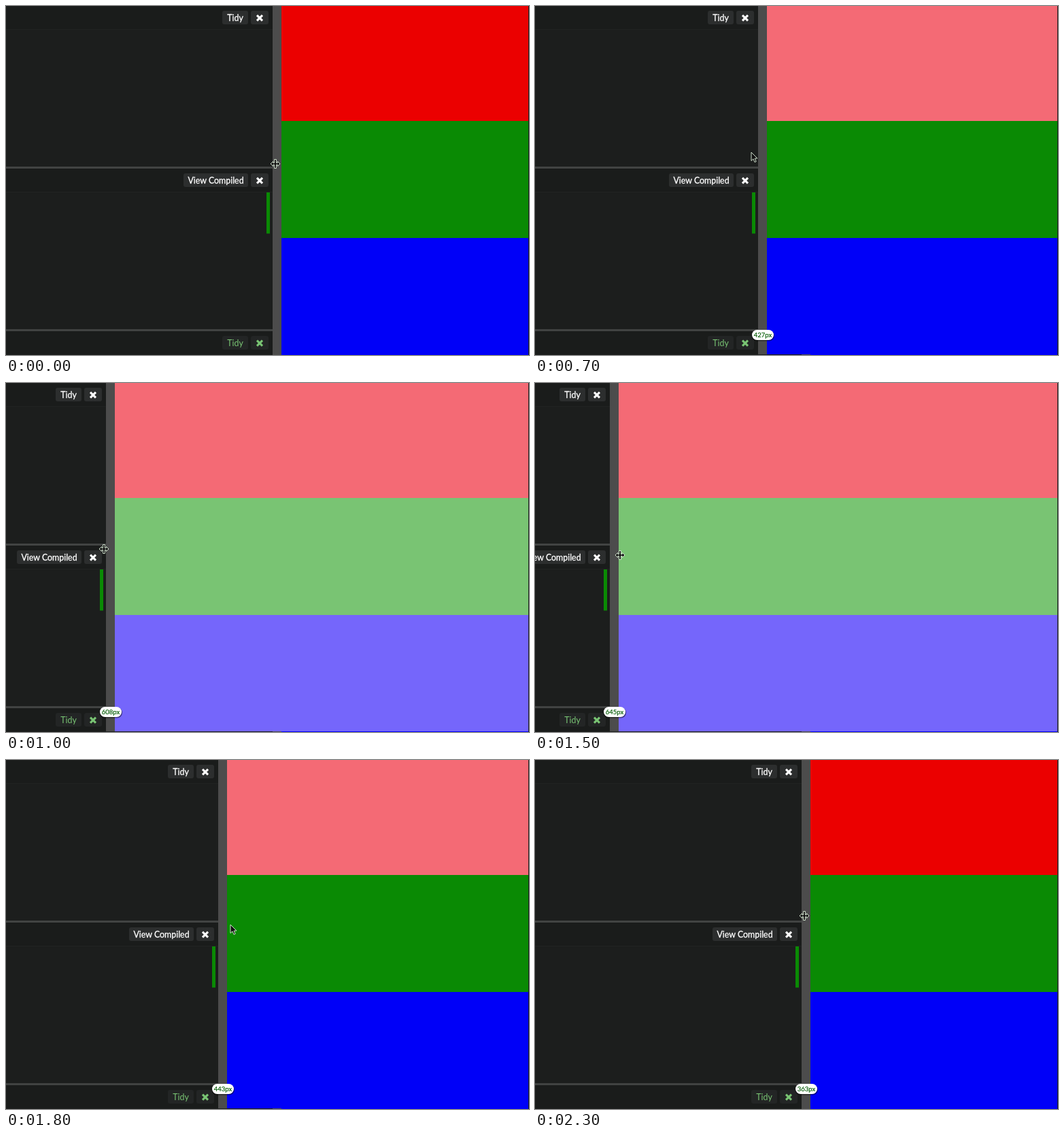
These frames come from a looping animation (769x513 px, 2400 ms). An HTML page:

```html
<!DOCTYPE html>
<html lang="en">
<head>
<meta charset="utf-8">
<title>Resizing split pane</title>
<style>
  html, body { margin: 0; width: 100%; height: 100%; overflow: hidden; background: #1c1e1d; }
  svg { display: block; font: 12.4px Lato, sans-serif; text-anchor: middle; }
  .label { fill: #fff; stroke: #fff; stroke-width: .3; }
  .button { fill: #2c2e2e; }
  .cross { stroke: #fff; stroke-width: 3.1; }
  .dim .label { fill: #79c473; stroke: none; }
  .dim .button { fill: #232525; }
  .dim .cross { stroke: #79c473; }
  .cursor { fill: #111; stroke: #e4f5e0; stroke-width: .9; }
</style>
</head>
<body>
<svg width="769" height="513" viewBox="0 0 769 513">
  <g id="pane">
    <g id="editors"></g>
    <rect x="-9" y="274" width="5" height="60.5" fill="#0a8a04"/>
    <rect width="14" height="513" fill="#4c4c4c"/>
    <g id="bands">
      <rect x="13" width="769" height="169"/>
      <rect x="13" y="169" width="769" height="172"/>
      <rect x="13" y="341" width="769" height="172"/>
    </g>
  </g>
  <rect x="768" width="1" height="513" fill="#181a1a"/>
  <g id="lastRow">
    <rect y="512" width="392" height="1" fill="#1c1e1d"/>
    <rect x="392" y="512" width="13" height="1" fill="#4c4c4c"/>
    <rect x="405" y="512" width="363" height="1" fill="#0000f8"/>
  </g>
  <g id="pill">
    <rect x="-16.5" y="477" width="33.5" height="15.5" rx="7.7" opacity=".45"/>
    <rect x="-16" y="476" width="32" height="15" rx="7.5" fill="#fff"/>
    <text id="size" y="487" font-size="9.5" fill="#0b600b" stroke="#0b600b" stroke-width=".2"></text>
  </g>
  <path id="arrow" class="cursor" d="M0 0V12.5L3 9.8 5 14.5 7.2 13.6 5.2 9H9Z"/>
  <path id="resize" class="cursor" d="M-7 0L-3.2-3.6V-1.3H-1.4V-6.5H1.4V-1.3H3.2V-3.6L7 0 3.2 3.6V1.3H1.4V6.5H-1.4V1.3H-3.2V3.6Z"/>
</svg>
<script>
const $ = id => document.getElementById(id);
const STEP = 100, LOOP = 2400;
const FULL = ['#eb0000', '#0a8a04', '#0000f8'];
const PALE = ['#f46a75', '#79c473', '#7566fb'];
const BREAKPOINTS = [400, 600, 600];

// step, divider x, mouse x, mouse y
const KEYS = [
  [1, 392, 396, 232], [2, 390, 391, 231], [4, 377, 372, 227], [7, 328, 318, 215],
  [10, 147, 144, 244], [11, 117, 119, 248], [12, 106, 109, 250], [14, 106, 109, 250],
  [15, 110, 125, 253], [16, 168, 200, 254], [18, 312, 330, 242], [19, 367, 381, 232],
  [20, 392, 396, 231], [23, 392, 396, 229]
];

function editor(top, label, width, dim) {
  const bar = top ? `<rect x="-800" y="${top - 3}" width="800" height="3" fill="#414342"/>` : '';
  return `${bar}<g transform="translate(0 ${top})" class="${dim ? 'dim' : ''}">
    <rect x="-800" width="800" height="34" fill="#1a1c1b"/>
    <rect x="-800" y="34" width="800" height="1" fill="#212322"/>
    <rect class="button" x="${-36 - width}" y="7" width="${width}" height="20" rx="3"/>
    <text class="label" x="${-36 - width / 2}" y="21.7">${label}</text>
    <rect class="button" x="-32" y="7" width="26" height="20" rx="3"/>
    <path class="cross" d="M-23 13.7l8 8m0-8l-8 8"/>
  </g>`;
}
$('editors').innerHTML =
  editor(0, 'Tidy', 38) + editor(239, 'View Compiled', 95) + editor(478, 'Tidy', 38, true);

function pose(step) {
  if (step <= KEYS[0][0]) return KEYS[0].slice(1);
  const i = KEYS.findIndex(key => key[0] >= step);
  const a = KEYS[i - 1], b = KEYS[i];
  const k = (step - a[0]) / (b[0] - a[0]);
  return [1, 2, 3].map(n => Math.round(a[n] + (b[n] - a[n]) * k));
}

function place(id, x, y, visible = true) {
  $(id).setAttribute('transform', `translate(${x} ${y})`);
  $(id).style.display = visible ? '' : 'none';
}

function draw() {
  const step = Math.floor(performance.now() % LOOP / STEP);
  const [divider, x, y] = pose(step);
  const width = 755 - divider;
  const outside = x < divider - 6 || x > divider + 16;
  place('pane', divider, 0);
  place('pill', divider + 7, 0, step > 1);
  place('arrow', x, y, outside);
  place('resize', x, y, !outside);
  $('size').textContent = width + 'px';
  [...$('bands').children].forEach((band, i) =>
    band.setAttribute('fill', (width >= BREAKPOINTS[i] ? PALE : FULL)[i]));
  requestAnimationFrame(draw);
}
draw();
</script>
</body>
</html>
```
